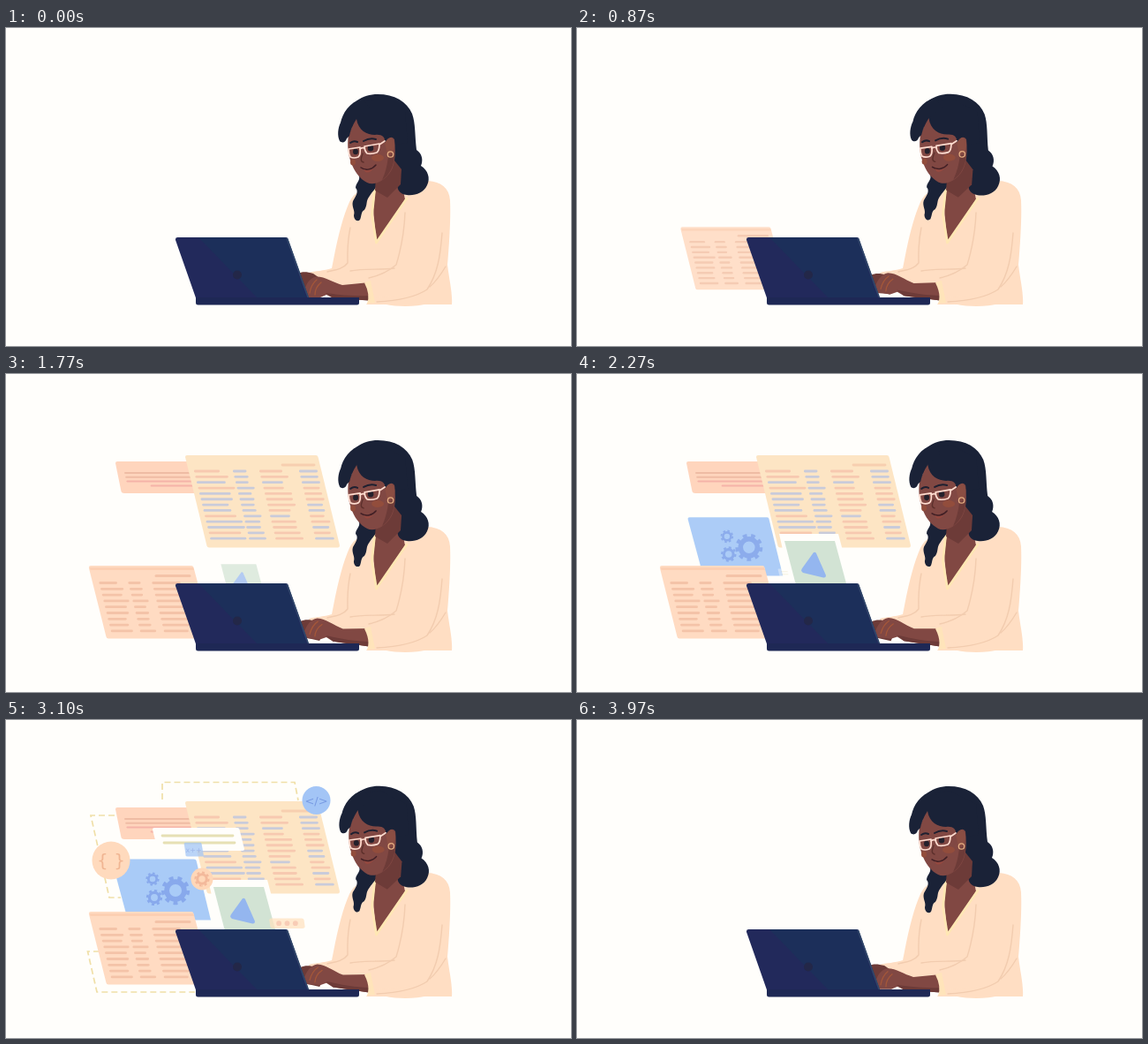
These frames come from a looping animation (640x360 px, 4010 ms). An HTML page:

```html
<!DOCTYPE html>
<html lang="en">
<head>
<meta charset="utf-8">
<title>Woman at a laptop</title>
<style>
  html, body { margin: 0; width: 100%; height: 100%; overflow: hidden; background: #fffefb; }
  svg { display: block; width: 100vw; height: 100vh; }
  text { font-family: "DejaVu Sans", sans-serif; text-anchor: middle; }
  .line { fill: none; stroke-linecap: round; stroke-linejoin: round; }
</style>
</head>
<body>
<svg viewBox="0 0 640 360">
  <g id="dashes" fill="none" stroke="#e8cf7c" stroke-width="1.700" stroke-dasharray="7 4">
    <path d="M177 90V70.500H327L331 91"/>
    <path d="M123 108H96L117 201H130"/>
    <path d="M106 262H92.500L103 308H214"/>
  </g>

  <g id="memo">
    <path d="M126 99H222L232 135H134Q131 135 130.500 133L124 101Q124 99 126 99Z" fill="#ffd5bd"/>
  </g>
  <g id="code">
    <path d="M205 92H351Q353 92 353.500 94L378 194Q378 196.500 376 196.500H230Q228 196.500 227.500 194.500L203 94Q203 92 205 92Z" fill="#fde5c4"/>
  </g>
  <g id="blue">
    <path d="M122 157.500H213Q215 157.500 215.500 159L232 226.500H138L120 160Q119.500 157.500 122 157.500Z" fill="#a9cbf7"/>
  </g>
  <g id="bar">
    <path d="M168 122H262Q264 122 264.500 124L270 146Q270 148 268 148H174Q172 148 171.500 146L166 124Q166 122 168 122Z" fill="#fffefb"/>
    <path class="line" d="M177 131H257M179 139H259" stroke="#e6e0b4" stroke-width="2.800"/>
  </g>
  <g id="sheet">
    <path d="M96 217H210Q212 217 212.500 219L234 299.500H116Q114 299.500 113.500 297.500L94 220Q93.500 217 96 217Z" fill="#ffdbc2"/>
    <path d="M95 219H212L213 222H95.500Z" fill="#fccfb2"/>
  </g>
  <g id="play">
    <path d="M229 181H296L325 291H254Z" fill="#fffefb"/>
    <path d="M235 189H292L318 285H260Z" fill="#d2e3d4"/>
    <path d="M268 202Q270 201 271 203L282 228Q282 231 279 230.500L256 225Q253 223 255 220Z" fill="#94b6ef"/>
  </g>

  <g id="chip">
    <path d="M180 85H203Q205 85 205.500 87L209 107H183Q181 107 180.500 105L178 87Q178 85 180 85Z" fill="#a0c4f6"/>
    <text x="193" y="100" font-size="11" fill="#789be3">x++</text>
  </g>
  <g id="pill">
    <path d="M316 204H363Q366 204 366.500 207L368 217Q368 220 364 220H318Q314 220 313.500 217L312 207Q312 204 316 204Z" fill="#ffe2bf"/>
    <g fill="#f6b99c"><circle cx="327" cy="212" r="4"/><circle cx="340" cy="212" r="4"/><circle cx="353" cy="212" r="4"/></g>
  </g>
  <g id="brace">
    <circle cx="119" cy="159" r="21.500" fill="#ffdabd"/>
    <text x="119" y="166" font-size="20" fill="#f0b592">{ }</text>
  </g>
  <g id="coin"><circle cx="222" cy="180" r="12.500" fill="#ffd7b8"/></g>
  <g id="tag">
    <circle cx="351.500" cy="91" r="16" fill="#a3c5f6"/>
    <text x="351.500" y="96" font-size="13" fill="#789be3">&lt;/&gt;</text>
  </g>
  <g id="cog"><circle cx="318" cy="237" r="16" fill="#a3c5f6"/></g>

  <!-- torso -->
  <path d="M418 177C405 181 394 186 389 197C381 215 375 241 371 262L369 272C360 275 350 275 343 277L346 286C356 286 366 290 378 295L410 294L412 308L408 313H505C506 300 502 285 500 268C502 245 504 215 503 195C502 181 493 174 478 173L450 176Z" fill="#ffdec3"/>
  <path d="M412 306C425 316 460 317 478 312L470 300Z" fill="#ffdec3"/>
  <g class="line" stroke="#f2ccaf" stroke-width="1.400">
    <path d="M452 209C451 235 446 255 442 268C433 276 424 280 411 283"/>
    <path d="M494 232C492 258 489 278 477 296C462 306 440 309 420 310"/>
    <path d="M390 226C386 245 387 258 387 266C382 273 372 274 364 276"/>
    <path d="M440 272C425 274 405 272 390 275M498 270C492 280 486 288 480 293"/>
  </g>
  <path d="M420 172L416 205L419.500 243L452 194L446 165Z" fill="#814843"/>
  <path class="line" d="M418 178L414.500 212L419.500 243L454 193" stroke="#ffe7b4" stroke-width="2.800"/>

  <path id="backHand" d="M330 278C336 275.500 341 276 348 278L358 285L352 300L334 296Z" fill="#6d3b38"/>
  <g id="frontHand">
    <path d="M412 288L381 291C370 288 361 281 351 281.500C343 283 339 292 337 300L340 305H356L363 302L371 306L412 308.500Z" fill="#814843"/>
    <path class="line" d="M352 285C347 289 345 294 344 300M357 288C352 292 350 297 350 302" stroke="#a4573a" stroke-width="1.300"/>
    <path d="M362 300C372 301 387 304 412 303V308.500L371 306Z" fill="#6d3b38"/>
  </g>
  <path d="M406 288.500Q409 286 413 286L418 311L409 312Q413 302 406 288.500Z" fill="#ffe4ba"/>

  <g id="head">
    <path d="M384 106C388 84 404 75 421 75C440 75 454 83 460 97C464 108 463 122 465 138C471 142 473 149 470 156C478 161 481 170 477 178C473 187 463 190 454 189C446 188 441 182 445 175L430 150L400 120Z" fill="#1a2237"/>
    <path d="M399 166C403 172 396 175 396 181C400 185 396 191 393 196C391 202 396 207 394 212C394 217 398 220 401 217C403 212 402 208 406 206C410 200 407 196 412 190C415 185 419 182 421 176Z" fill="#1a2237"/>
    <path d="M419 168L418 184L432 192L447 177L448 160L440 150Z" fill="#6d3b38"/>
    <path d="M396 102L388 121C386 133 388 145 391 152C394 162 401 171 409 175C417 179 428 173 434 165C440 158 442 145 440 126L424 108Z" fill="#814843"/>
    <path d="M433 145L440 143C440 155 435 166 426 172C430 163 432 155 433 145Z" fill="#6d3b38"/>
    <path d="M428 125C435 121 441 126 440 134C439 140 436 144 432 143Z" fill="#8b4e43"/>
    <ellipse cx="421" cy="147" rx="7" ry="4" fill="#924d3c"/>
    <ellipse cx="393" cy="152" rx="3" ry="3.500" fill="#924d3c"/>
    <path d="M397 103C399 116 409 121 418 121C425 120 430 123 429 130C434 121 441 122 442 132L455 130L452 95L422 80L400 84Z" fill="#1a2237"/>
    <path d="M403 80C389 84 381 97 379 107C376 113 375 122 378 128C381 131 385 129 386 125L389 122C391 113 394 108 397 103L412 90Z" fill="#1a2237"/>
    <path class="line" d="M390 130Q394 127 398 129M405 128Q412 124 419 126" stroke="#1f2030" stroke-width="2"/>
    <g fill="#24202b">
      <ellipse cx="396" cy="140" rx="3" ry="3.300"/><ellipse cx="413" cy="136" rx="3.300" ry="3.500"/>
    </g>
    <path class="line" d="M404 142C402 148 401 151 405 152" stroke="#5d302c" stroke-width="1.400"/>
    <path class="line" d="M402 158C408 162 415 160 419 155" stroke="#401f25" stroke-width="1.500"/>
    <path d="M405 160Q411 163 416 159Q412 165 407 163Z" fill="#94483f"/>
    <g class="line" stroke="#ffdccf" stroke-width="1.700">
      <path d="M388 137L401 135Q402 144 399 146Q394 148 390 146Q388 142 388 137Z"/>
      <path d="M406 134L423 131Q423 139 420 141Q414 143 409 142Q406 139 406 134Z"/>
      <path d="M401 137Q404 135 406 136M423 132L429 128"/>
    </g>
    <circle cx="435.500" cy="143" r="3.200" fill="none" stroke="#e5ad82" stroke-width="1.300"/>
  </g>

  <!-- laptop -->
  <path d="M194.500 237H317Q319 237 319.500 239L343 305.500H215L192 240Q191.500 237 194.500 237Z" fill="#22295b"/>
  <path d="M218 237H317L340 305H284Z" fill="#1c2f5a"/>
  <path class="line" d="M318.500 238.500L342 304.500" stroke="#30476a" stroke-width="1.800"/>
  <circle cx="262" cy="279.500" r="5" fill="#232748"/>
  <path d="M215 305H400V311Q400 313.500 397.500 313.500H217.500Q215 313.500 215 311Z" fill="#1e2855"/>
</svg>

<script>
const LOOP = 4010, CX = 263, CY = 277;
const FIRST = 335, STAGGER = 330, GROW = 700, EXIT = 3750, SHRINK = 210;
const $ = id => document.getElementById(id);
const clamp = x => Math.min(1, Math.max(0, x));

function smooth(x) {
  const k = clamp(x);
  return k * k * (3 - 2 * k);
}

function add(parent, tag, attrs) {
  const el = document.createElementNS("http://www.w3.org/2000/svg", tag);
  for (const k in attrs) el.setAttribute(k, attrs[k]);
  return parent.appendChild(el);
}

function rnd(n) {
  const v = Math.sin(n * 91.7) * 4373.3;
  return v - Math.floor(v);
}

function rule(parent, x, y, w, stroke, width) {
  add(parent, "path", { class: "line", d: `M${x} ${y}h${w}`, stroke, "stroke-width": width });
}

function gear(parent, cx, cy, r, stroke, teeth = 8) {
  const ring = { cx, cy, fill: "none", stroke };
  add(parent, "circle", { ...ring, r: r * .62, "stroke-width": r * .36 });
  add(parent, "circle", { ...ring, r: r * .88, "stroke-width": r * .26,
    pathLength: teeth * 2, "stroke-dasharray": "1 1" });
}

// slanted rows of text: columns are [x at the top edge, longest width]
function rows(parent, top, y0, step, count, slant, cols, colour, width) {
  for (let i = 0; i < count; i++) {
    const y = y0 + i * step;
    cols.forEach(([x, w], c) => {
      const r = rnd(i * 5 + c + 1);
      rule(parent, x + (y - top) * slant, y, w * (.65 + .35 * r), colour(i, c), width);
    });
  }
}

const PINK = "#f4c3a8", GREY = "#c9cbda";
rule($("sheet"), 170, 228.5, 38, PINK, 3);
rows($("sheet"), 217, 236.5, 6.8, 9, .245, [[102, 27], [135, 16], [162, 38]], () => PINK, 2.8);
rule($("code"), 313, 103, 36, "#f7cfb0", 2.8);
rows($("code"), 92, 110, 6.35, 13, .24, [[210, 40], [254, 18], [284, 30], [329, 19]],
  (i, c) => (c === 1 || rnd(i * 7 + c * 3) > .72) ? GREY : "#f7c9b0", 2.8);
for (let i = 0; i < 4; i++) {
  const inset = i > 2 ? 26 : 0;
  rule($("memo"), 135 + i * 1.2 + inset, 112 + i * 4.8, 82 - inset, i > 1 ? "#f5b3a8" : "#efbca4", 2);
}

gear($("blue"), 192, 193, 16, "#88a9ec", 9);
gear($("blue"), 166, 180, 7.5, "#88a9ec");
gear($("blue"), 168, 201, 9, "#88a9ec");
gear($("coin"), 222, 180, 8.5, "#f3b99b");
gear($("cog"), 318, 237, 11, "#7f9fe6");

// each group pops out of the laptop one beat after the last
const BEATS = [
  ["sheet"], ["memo"], ["code"], ["play"], ["blue"], ["bar"],
  ["brace", "coin", "tag"], ["chip", "pill", "cog"]
];
const parts = BEATS.flatMap((ids, beat) =>
  ids.map(id => ({ el: $(id), start: FIRST + beat * STAGGER })));
const dashStart = FIRST + (BEATS.length - 1) * STAGGER;

function draw(t) {
  const stay = 1 - smooth((t - EXIT) / SHRINK);
  for (const { el, start } of parts) {
    const s = smooth((t - start) / GROW) * stay;
    el.setAttribute("transform", `translate(${CX} ${CY}) scale(${s}) translate(${-CX} ${-CY})`);
    el.setAttribute("opacity", s);
  }
  $("dashes").setAttribute("opacity", clamp((t - dashStart) / GROW) * stay);

  const wave = n => (1 - Math.cos(t / LOOP * n * 2 * Math.PI)) / 2;
  const tap = wave(6);
  $("head").setAttribute("transform", `rotate(${wave(2) * 1.1} 440 185)`);
  $("frontHand").setAttribute("transform", `rotate(${tap * 6} 411 298)`);
  $("backHand").setAttribute("transform", `translate(${tap * 4} ${tap * 2.5})`);
}

function tick() {
  draw(performance.now() % LOOP);
  requestAnimationFrame(tick);
}
tick();
</script>
</body>
</html>
```
